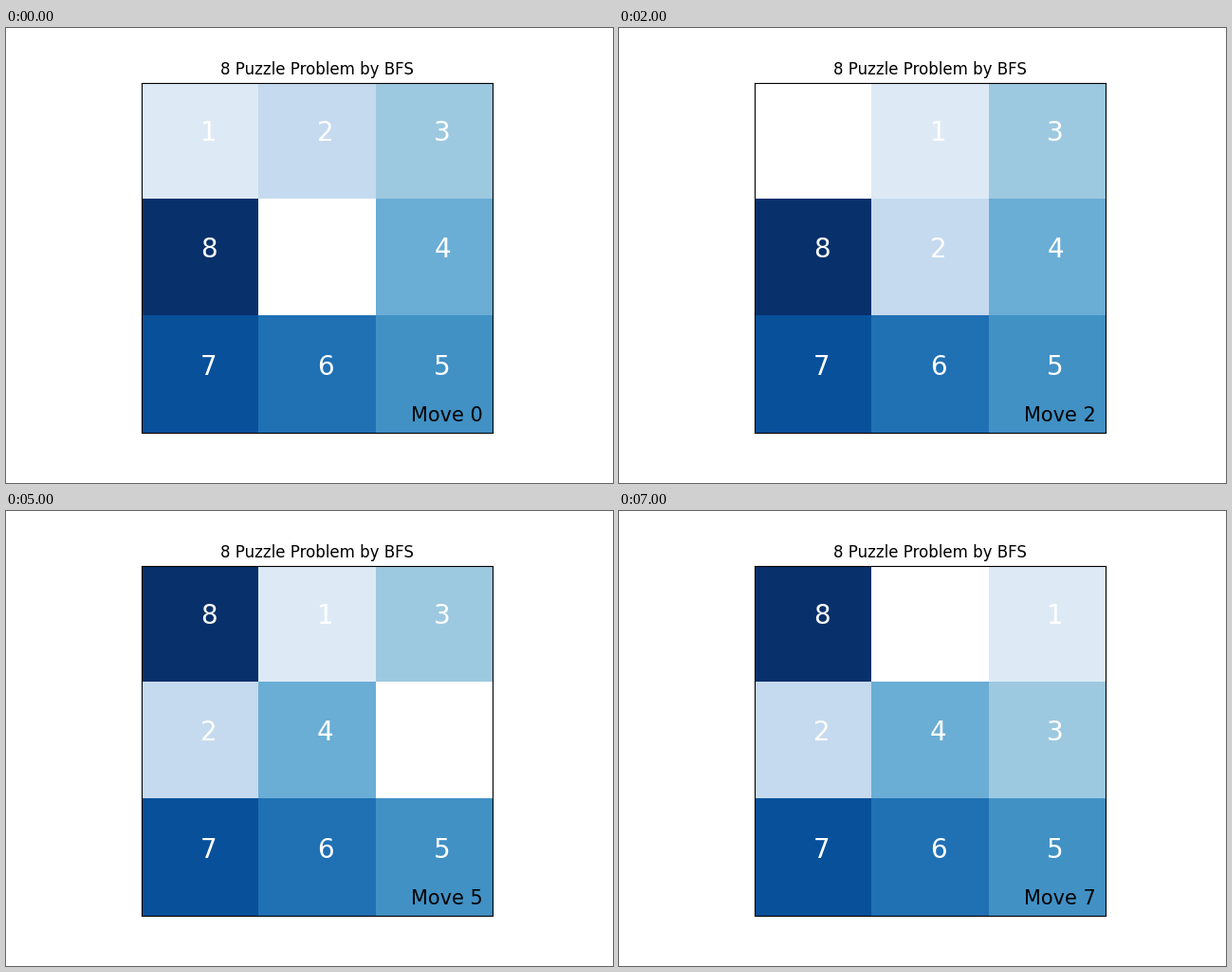
Write a matplotlib script that moves like this. It is 640 px wide and 480 px high and loops after 8 s.

```python
import matplotlib.pyplot as plt
import numpy as np
from matplotlib.animation import FuncAnimation

START = np.array([[1, 2, 3], [8, 0, 4], [7, 6, 5]])
STEPS = {"U": (-1, 0), "D": (1, 0), "L": (0, -1), "R": (0, 1)}
BLANK_PATH = "ULDRRUL"


def board_after(moves):
    """Return the board after the blank has made the given number of moves."""
    board = START.copy()
    row, col = 1, 1
    for step in BLANK_PATH[:moves]:
        dr, dc = STEPS[step]
        board[row, col] = board[row + dr, col + dc]
        row, col = row + dr, col + dc
        board[row, col] = 0
    return board


def masked(board):
    return np.ma.masked_equal(board, 0)


plt.rcParams["font.family"] = "DejaVu Sans"
fig, ax = plt.subplots(figsize=(6.4, 4.8), dpi=100)
ax.set_title("8 Puzzle Problem by BFS")
ax.set_xticks([])
ax.set_yticks([])

tiles = ax.imshow(masked(START), cmap="Blues", vmin=0, vmax=8,
                  interpolation="nearest")
labels = {(r, c): ax.text(c, r, "", fontsize=20, color="white")
          for r, c in np.ndindex(3, 3)}
counter = ax.text(1.8, 2.4, "", fontsize=15, color="black")


def draw(move):
    board = board_after(move)
    tiles.set_data(masked(board))
    for cell, label in labels.items():
        label.set_text(str(board[cell]) if board[cell] else "")
    counter.set_text(f"Move {move}")
    return [tiles, counter, *labels.values()]


anim = FuncAnimation(fig, draw, frames=len(BLANK_PATH) + 1, interval=1000,
                     repeat=True, repeat_delay=0, blit=False)
plt.show()
```
